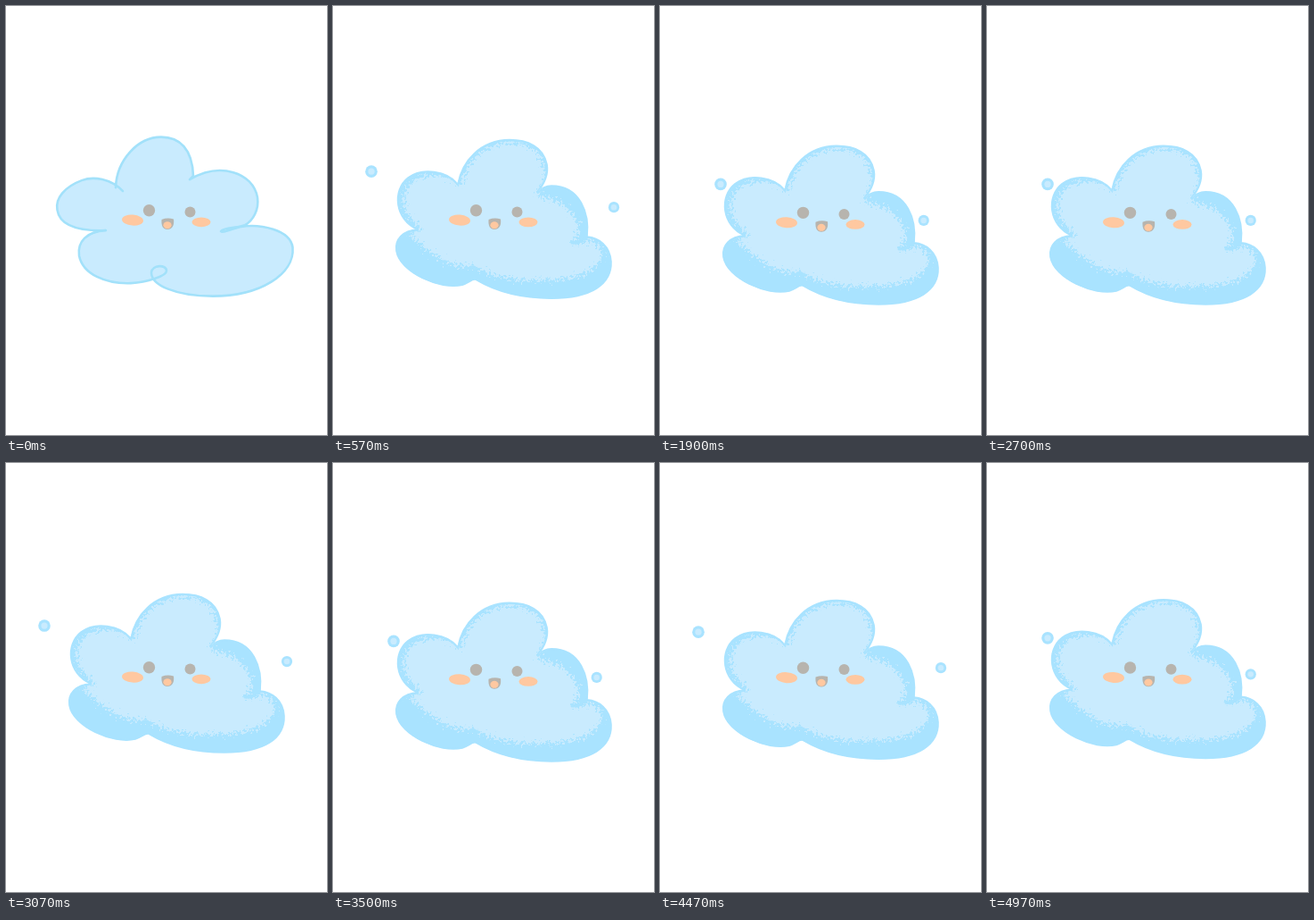
An HTML page that plays this animation: 360x480 px, repeating every 5000 ms.

```html
<!DOCTYPE html>
<html lang="en">
<head>
<meta charset="utf-8">
<title>Cloud</title>
<style>
  html, body { margin: 0; width: 100%; height: 100%; overflow: hidden; background: #fff; }
  svg { display: block; width: 100vw; height: 100vh; }
  .line { stroke: #a2e1fa; stroke-width: 2.6; stroke-linecap: round; stroke-linejoin: round; }
  .light { fill: #c9ebfe; }
  .shade { fill: #a9e3ff; }
  .edge { fill: none; stroke: #a9e3ff; stroke-width: 3; stroke-linecap: round; }
  .rim { stroke: #a9e3ff; stroke-width: 1.6; }
  .grey { fill: #b7b4ae; }
  .peach { fill: #ffc8a0; }
</style>
</head>
<body>
<svg viewBox="0 0 360 480">
  <defs>
    <filter id="grain" x="-10%" y="-10%" width="120%" height="120%">
      <feTurbulence type="fractalNoise" baseFrequency=".36" numOctaves="2" seed="4"/>
      <feDisplacementMap in="SourceGraphic" scale="22" xChannelSelector="R" yChannelSelector="G"/>
    </filter>
    <path id="puff" d="M140 206C128 191 100 187 84 199C66 213 69 246 95 257C78 258 69 268 71 281
      C75 305 120 325 145 319C152 317 156 312 160 313C185 328 215 334 245 334C290 334 313 318 312 293
      C311 275 298 266 285 265C288 240 278 208 245 208Q236 208 229 216C238 205 242 195 240 184
      C236 164 218 156.5 198 156.5C165 157 145 180 140 206Z"/>
    <clipPath id="inside"><use href="#puff"/></clipPath>
    <g id="body">
      <use href="#puff" class="shade rim"/>
      <g clip-path="url(#inside)">
        <path class="light" filter="url(#grain)" d="M143 208C130 194 104 192 90 203C74 216 75 238 100 256
          L84 262C100 272 108 285 125 292C140 299 152 297 160 299C180 310 210 316 235 313
          C265 314 285 308 300 292C306 280 296 270 285 269C272 275 268 274 268 270
          C276 262 278 252 269 240C259 228 245 220 228 220C238 205 238 195 236 184
          C232 167 215 160 198 160C168 161 150 182 143 208Z"/>
        <use href="#puff" class="edge"/>
      </g>
      <path class="edge" d="M268 272Q276 273 284 265M154 299Q161 297 160 304"/>
    </g>
    <g id="drop">
      <circle class="shade" r="6.8"/>
      <circle class="light" r="3.6"/>
    </g>
  </defs>

  <g class="pose">
    <path class="light line" d="M131 207C118 193 98 190 85 195C66 202 55 215 57.5 228C60 245 78 252 112 251
      C90 252 80 264 82 279C86 300 112 311 140 310C158 309 180 302 180 296C180 289 164 289 163 298
      C163 312 190 324.5 232 324.5C285 324.5 324 300 321.5 270C319 250 285 243 262 247
      C252 250 243 254 241 252C243 248 260 248 268 245C277 240 284 228 282 214
      C277 186 240 174 206 194L210 190C209 160 195 146.5 174 146.5C148 146.5 124 172 123 203"/>
  </g>
  <g class="pose">
    <use href="#body"/>
    <use href="#drop" x="68" y="199.5"/>
    <use href="#drop" transform="translate(295.7 240) scale(.9)"/>
  </g>
  <g class="pose">
    <use href="#body"/>
    <use href="#drop" x="43" y="192"/>
    <use href="#drop" transform="translate(315 232) scale(.9)"/>
  </g>

  <g id="face">
    <circle class="grey" cx="160.5" cy="228.7" r="6.7"/>
    <circle class="grey" cx="206.5" cy="230.4" r="6"/>
    <ellipse class="peach" cx="142" cy="239.6" rx="12" ry="6" transform="rotate(4 142 239.6)"/>
    <ellipse class="peach" cx="219" cy="241.8" rx="10.5" ry="5.4"/>
    <path class="grey" d="M174.5 239Q181 236.5 188 238.5C189 246 186 250 181 250S174 246 174.5 239Z"/>
    <ellipse class="peach" cx="181" cy="245.2" rx="4.6" ry="4"/>
  </g>
</svg>
<script>
  const LOOP = 5000, FRAMES = 150, CYCLE = 24, RISE = 10.5;
  const poses = [...document.querySelectorAll('.pose')];
  const face = document.getElementById('face');
  const rest = [-0.7, -RISE, -RISE];
  const move = (el, y) => el.setAttribute('transform', `translate(0 ${y.toFixed(2)})`);

  function draw() {
    const frame = Math.floor(performance.now() % LOOP / LOOP * FRAMES + 0.01);
    const phase = frame % CYCLE;
    // 0 at the top of the bob, 1 at the bottom
    const dip = (1 - Math.cos((phase + 0.5 - 22.3) / CYCLE * 2 * Math.PI)) / 2;
    const shown = Math.floor((phase + 3) % CYCLE / 8);
    poses.forEach((pose, i) => {
      pose.style.display = i === shown ? '' : 'none';
      move(pose, rest[i] + RISE * dip);
    });
    move(face, 2.8 * dip ** 5);
    requestAnimationFrame(draw);
  }
  draw();
</script>
</body>
</html>
```
